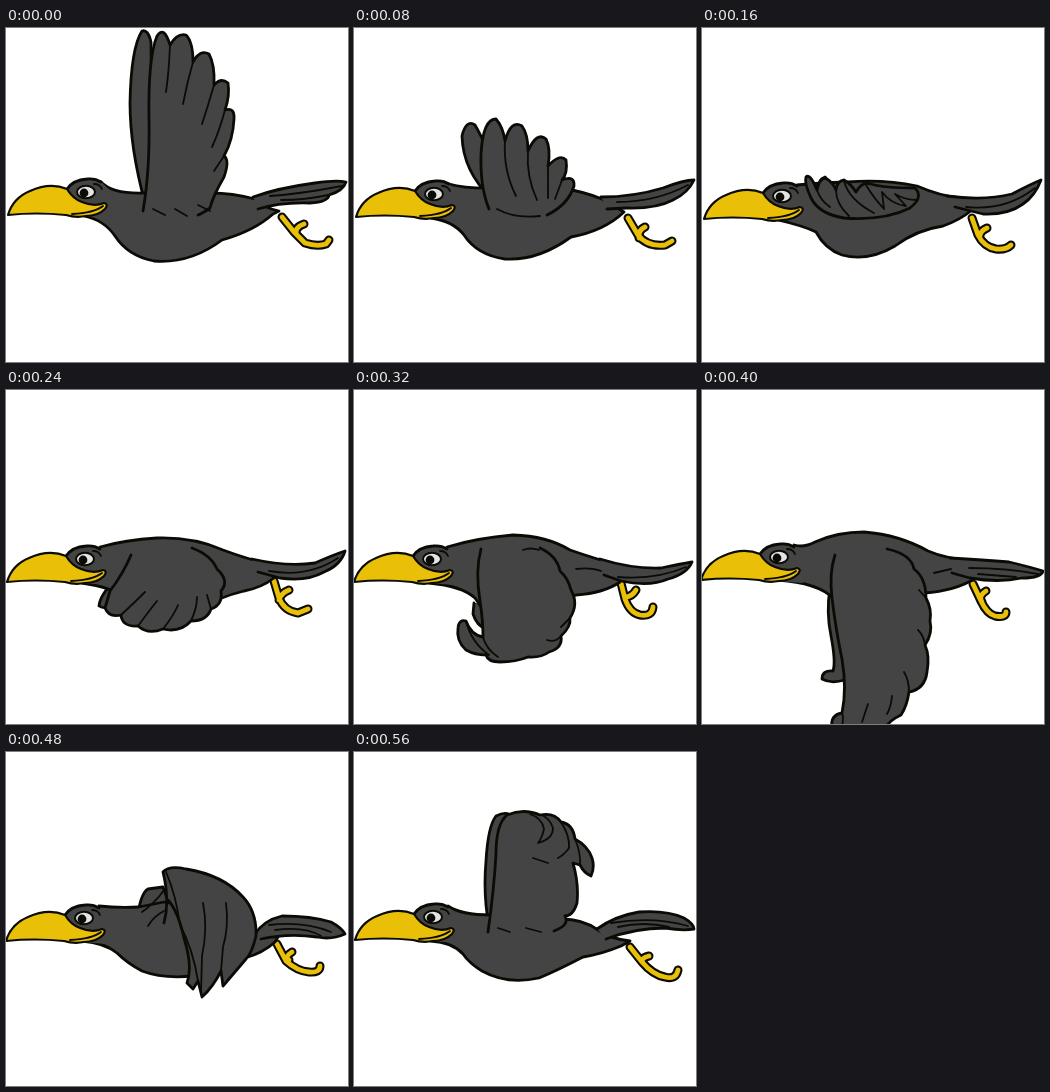
Write an HTML page that moves like this. It is 342 px wide and 334 px high and loops after 640 ms.

```html
<!DOCTYPE html>
<html lang="en">
<head>
<meta charset="utf-8">
<title>Flying bird</title>
<style>
  html, body { margin: 0; width: 100%; height: 100%; overflow: hidden; background: #fff; }
  svg { display: block; width: 342px; height: 334px; }
  path { fill: none; stroke: #0b0b05; stroke-width: 2.8; stroke-linejoin: round; stroke-linecap: round; }
  .skin { fill: #444; }
  .patch { fill: #444; stroke: none; }
  .fine { stroke-width: 1.8; }
  .leg { stroke-width: 9; }
  .leg + .leg { stroke: #e9c007; stroke-width: 4.8; }
  .beak { fill: #e9c007; stroke-width: 2.2; }
</style>
</head>
<body>
<svg id="stage" viewBox="0 0 342 334"></svg>
<script>
const STEP = 80;

// One pose per step of the wing beat; "head" is the offset of the shared head.
const poses = [
  {
    head: [0, 0],
    back: 'M139 175Q124 120 124 75Q125 20 136 3Q142 1 145 14L146 150',
    tail: 'M247 169Q272 160 309 155Q330 152 340 154Q337 163 323 167Q322 174 304 175Q274 174 252 181',
    tailLines: 'M264 168Q294 166 336 158M275 172Q300 172 322 167',
    foot: 'M276 189L288 204L299 215Q311 219 320 216L323 212M290 206Q289 199 298 196',
    body: 'M95 154Q106 166 138 165L205 165Q226 165 249 171Q258 180 273 183L267 186Q248 203 216 212Q184 236 148 233Q122 228 109 208Q98 192 78 188',
    wing: 'M137 183Q144 143 143 90Q142 30 151 8Q158 -3 164 17Q171 5 180 7Q187 14 187 34Q194 21 203 26Q209 37 208 57Q215 49 222 55Q224 68 219 82Q229 79 228 91Q227 112 218 128Q224 132 218 149Q207 168 204 180Q197 185 192 187',
    lines: 'M164 17Q163 43 160 64M187 34Q181 55 177 76M208 57Q202 78 196 96M219 82Q213 104 206 119M218 128L208 143M147 181L159 187M169 181L181 188M192 177L204 183'
  },
  {
    head: [0, 2],
    back: 'M137 170Q109 143 108 108Q112 91 121 97Q131 114 147 155',
    tail: 'M247 169Q279 169 309 160Q330 152 340 152Q334 165 319 172Q302 181 272 180L253 181',
    tailLines: 'M263 174Q302 174 334 157',
    foot: 'M274 190L284 207Q293 219 311 217L318 213M285 210Q284 202 291 199',
    body: 'M95 156Q112 161 143 160L206 160Q228 163 248 171L270 184Q250 203 217 209Q184 233 151 231Q123 227 110 207Q99 193 77 190',
    wing: 'M135 181Q126 159 127 126Q129 91 142 91Q149 99 151 113Q157 91 168 98Q174 106 174 123Q183 103 192 111Q197 121 194 138Q206 125 212 132Q214 145 208 152Q221 147 220 158Q214 177 193 187',
    lines: 'M151 113Q149 142 162 168M174 123Q172 148 183 172M194 138L194 170M208 152L201 171M143 181Q161 191 186 188'
  },
  {
    head: [0, 4],
    back: 'M116 162Q116 151 123 149L132 160',
    tail: 'M245 168Q282 173 310 166Q329 156 339 152Q333 168 321 176Q306 187 281 186L253 179',
    tailLines: 'M264 179Q304 183 333 160',
    foot: 'M270 190L276 207Q282 219 294 221Q304 222 309 217M278 208Q278 203 285 200',
    body: 'M95 157Q116 155 145 154Q182 151 215 158Q238 168 259 170L270 182Q258 192 241 198Q214 202 193 218Q166 234 140 227Q123 221 114 204Q102 198 76 192',
    wing: 'M213 160Q222 169 208 180Q182 193 142 190Q117 186 109 170Q102 155 104 149Q108 145 115 162Q117 151 123 150Q130 153 134 162Q135 153 142 152Q149 156 154 164Q160 153 169 156Q182 160 213 160',
    lines: 'M115 162Q118 172 128 179M134 162Q134 176 147 188M142 153Q147 172 172 185M164 157Q171 169 182 181L180 164Q189 176 204 178L193 166Q203 172 215 172'
  },
  {
    head: [-1, 5],
    back: 'M109 190Q94 205 93 216Q101 222 127 209',
    tail: 'M246 169Q281 177 309 173Q327 165 339 161Q335 175 318 182Q300 192 274 188L252 182',
    tailLines: 'M263 181Q302 188 332 168',
    foot: 'M268 191L273 208Q278 221 292 223L302 219M273 210Q275 203 283 200',
    body: 'M94 157Q119 150 151 148Q188 147 217 160Q241 169 263 174L268 188Q255 198 238 201Q213 207 192 220Q166 232 141 228Q122 220 114 204Q102 197 76 193',
    wing: 'M125 165Q117 184 104 201L99 218Q103 228 115 225Q116 237 132 236Q142 245 157 239Q174 243 185 231Q201 231 205 219Q217 215 215 201Q224 191 211 179Q205 165 186 158',
    lines: 'M115 225Q128 213 139 202M132 236Q143 221 151 211M157 239Q168 225 172 215M185 231Q191 218 191 207M205 219L201 205'
  },
  {
    head: [-2, 5],
    back: 'M120 213L119 224Q123 236 131 238L136 213',
    tail: 'M246 169Q278 179 307 178Q326 174 338 172Q333 184 314 189Q296 197 267 191L250 185',
    tailLines: 'M264 187Q302 190 332 177',
    foot: 'M267 193L271 209Q276 223 286 225Q298 227 299 217M271 207Q278 207 282 200',
    body: 'M93 157Q123 148 159 145Q193 146 216 160Q239 168 267 176L266 192Q250 203 222 205L175 225L130 221L121 208Q108 196 75 193',
    wing: 'M127 159Q121 181 126 211Q129 231 129 247Q117 245 112 231Q105 229 104 238Q102 251 112 260Q121 265 132 265Q134 272 146 272Q162 272 174 267Q187 268 195 262Q209 258 207 246Q217 237 216 228Q225 214 217 200Q214 188 206 181Q203 166 186 158',
    lines: 'M112 231Q117 252 135 265M129 247Q132 259 144 267M207 246Q201 253 193 250M216 228L207 237M185 160Q176 157 169 160M222 179Q237 177 247 181'
  },
  {
    head: [-3, 3],
    back: 'M128 198Q124 222 129 246Q134 272 131 281Q120 280 120 289Q129 294 143 290L139 211',
    tail: 'M248 168Q282 170 307 172Q328 177 341 181Q339 188 320 188Q296 193 268 188L250 183',
    tailLines: 'M267 178Q305 178 336 184M276 184L314 187',
    foot: 'M271 194L279 211Q285 224 293 226Q304 228 304 222M280 212Q276 206 284 201',
    body: 'M92 155Q102 158 113 152Q135 142 162 142Q198 145 226 161Q242 168 270 171L274 188Q253 201 222 203L173 219L131 208Q116 193 76 190',
    wing: 'M133 165Q127 183 130 208Q134 241 140 269Q145 299 140 323Q128 325 130 338L183 338Q188 330 199 325Q205 316 207 302Q223 299 225 282Q228 266 223 255Q231 243 228 231Q230 219 224 208Q224 188 212 179Q209 164 185 159',
    lines: 'M140 323Q142 327 140 336M207 302Q207 290 202 282M223 255Q222 246 216 240M185 324Q189 317 190 306M160 332L166 314M224 208L217 200M232 183L249 179'
  },
  {
    head: [-2, 2],
    back: 'M132 162Q135 141 142 137L157 135L166 160',
    tail: 'M248 183Q258 168 276 164Q305 164 325 170Q336 176 339 182Q326 188 311 185Q282 181 255 187',
    tailLines: 'M263 173Q298 169 325 180M269 178Q299 174 315 184',
    foot: 'M271 192L280 209Q291 219 303 220Q314 221 314 214M283 208Q278 205 286 200',
    body: 'M93 154Q111 156 133 155L158 150L237 166L249 181Q258 185 272 185L269 190Q257 201 239 206L187 224Q157 227 136 219Q121 211 111 201Q99 191 76 189',
    wing: 'M158 171Q164 149 157 120Q163 113 180 117Q217 123 237 145Q251 160 250 184Q246 201 240 207L217 234L215 219Q207 235 196 245L192 229L187 237L181 231Q187 215 178 186Q172 159 162 148',
    lines: 'M160 120Q170 143 174 173Q187 197 192 229M197 151Q202 176 196 204L195 240M220 151Q223 175 217 195L215 219M136 160Q149 151 158 138M142 174Q148 164 158 159'
  },
  {
    head: [-1, 1],
    back: 'M135 174Q129 143 132 109Q134 74 142 64Q154 58 159 66L151 158',
    tail: 'M243 177Q261 164 285 160Q313 158 330 166Q340 172 340 177Q329 179 311 176Q281 176 252 187',
    tailLines: 'M257 171Q299 164 334 174M264 175Q290 169 315 175',
    foot: 'M276 195L288 210Q299 223 311 225Q322 228 324 218M289 211Q286 206 295 204',
    body: 'M94 154Q107 163 137 163L207 167Q229 167 244 178Q257 187 276 189L267 194Q248 202 229 205Q202 219 185 226Q153 233 128 219Q115 211 109 202Q98 190 77 189',
    wing: 'M134 180Q140 138 142 102Q142 72 153 63Q170 56 186 63Q200 60 207 70Q219 72 221 87Q234 94 238 106Q241 115 237 124Q230 121 226 113L219 111Q225 132 223 151Q219 164 211 164Q216 173 200 179',
    lines: 'M176 62Q188 66 190 77Q188 86 184 91Q199 87 199 76Q196 67 188 63M207 70Q216 84 215 96Q210 103 204 106M221 87Q227 101 226 113M179 106L194 111M144 176L156 180M172 176L187 180'
  }
];

const path = (d, cls = '') => `<path class="${cls}" d="${d}"/>`;

const head = ([x, y]) => `<g transform="translate(${x} ${y})">
  ${path('M60 162Q67 152 81 151L94 153L108 166L104 190L76 188Z', 'patch')}
  ${path('M61 161Q67 152 81 151Q89 150 95 154')}
  ${path('M2 187Q7 170 24 163Q44 154 61 161Q67 171 76 174Q88 179 98 175Q103 176 99 181Q92 188 80 188Q70 190 60 187Q30 184 2 187Z', 'beak')}
  ${path('M66 186Q88 185 97 178M88 156Q94 156 96 161', 'fine')}
  <ellipse cx="80" cy="164" rx="9" ry="6.2" fill="#e4e4e4" stroke="#0b0b05" stroke-width="2"/>
  <circle cx="78" cy="165" r="4.4" fill="#0b0b05"/>
</g>`;

const bird = p => [
  path(p.back, 'skin'),
  path(p.foot, 'leg'),
  path(p.foot, 'leg'),
  path(p.body, 'skin'),
  path(p.tail, 'skin'),
  path(p.tailLines, 'fine'),
  head(p.head),
  path(p.wing, 'skin'),
  path(p.lines, 'fine')
].join('');

const stage = document.getElementById('stage');
stage.innerHTML = poses.map(p => `<g opacity="0">${bird(p)}</g>`).join('');

// Each pose is visible for one step of the loop.
const duration = STEP * poses.length;
[...stage.children].forEach((group, i) => {
  group.animate([
    { opacity: 1, offset: 0, easing: 'step-end' },
    { opacity: 0, offset: 1 / poses.length },
    { opacity: 0, offset: 1 }
  ], { duration, delay: i * STEP - duration, iterations: Infinity });
});
</script>
</body>
</html>
```
